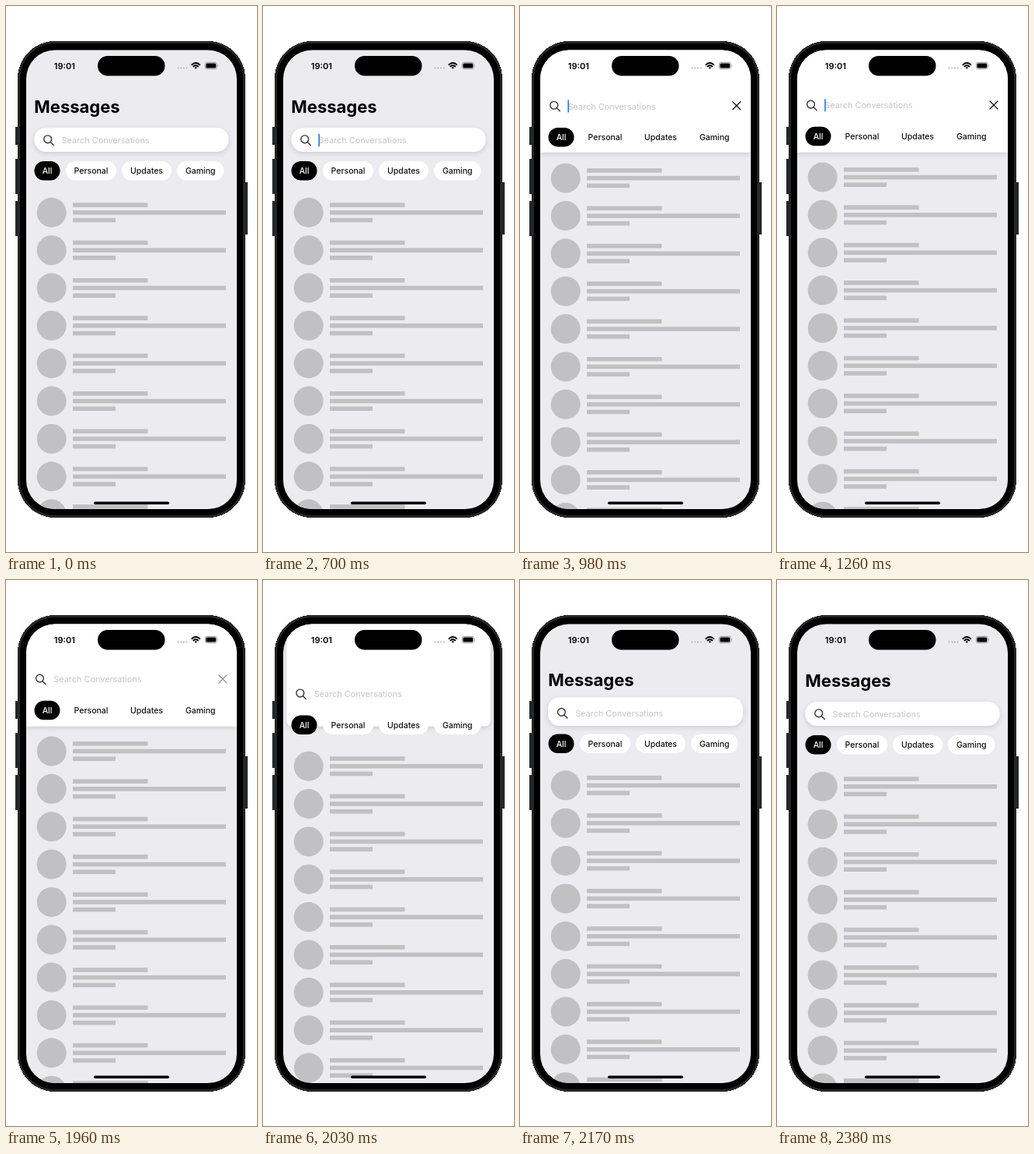
Write an HTML page that moves like this. It is 323 px wide and 700 px high and loops after 3.47 s.

```html
<!DOCTYPE html>
<html lang="en">
<head>
<meta charset="utf-8">
<title>Search field</title>
<style>
html, body { margin: 0; width: 100%; height: 100%; overflow: hidden; background: #fff; }
svg { display: block; width: 323px; height: 700px; font-family: Inter, Roboto, sans-serif; }
#field { filter: drop-shadow(0 2px 3px rgba(0, 0, 0, .13)); fill: #fff; }
.chip { font-size: 10.5px; font-weight: 500; text-anchor: middle; }
.line { fill: none; stroke-linecap: round; }
</style>
</head>
<body>
<svg viewBox="0 0 323 700">
  <defs>
    <clipPath id="screen"><rect x="26" y="56.5" width="271" height="588.5" rx="37"/></clipPath>
  </defs>

  <g shape-rendering="crispEdges">
    <path d="M12 155h4v23h-4zM12 196h4v45h-4zM12 250h4v45h-4zM307 226h4v67h-4z" fill="#242626"/>
    <rect x="15" y="45" width="293" height="611" rx="48" fill="#242828"/>
  </g>
  <rect x="18" y="48" width="287" height="605" rx="45"/>

  <g clip-path="url(#screen)">
    <rect x="26" y="56" width="271" height="590" fill="#ebebf0"/>
    <g id="page">
      <text x="36.3" y="137" font-size="22" font-weight="700">Messages</text>
      <g id="rows" fill="#c1c1c3"></g>
    </g>
    <rect id="field"/>
    <g id="chips"></g>
    <g id="search">
      <g class="line" stroke="#333" stroke-width="1.4">
        <circle cx="53.7" cy="170.8" r="4.9"/><path d="M57.3 174.4l4 4"/>
      </g>
      <text x="71.5" y="176.2" font-size="10.9" fill="#c5c5c8">Search Conversations</text>
      <rect id="caret" x="71.3" y="164" width="1.7" height="16" fill="#2c83dc"/>
    </g>
    <g id="close" class="line" stroke="#111" stroke-width="1.3">
      <path pathLength="1" d="M5-5L-5 5"/><path pathLength="1" d="M-5-5L5 5"/>
    </g>

    <text x="75.3" y="80.7" font-size="11" font-weight="600" text-anchor="middle">19:01</text>
    <rect x="118" y="64" width="86.5" height="25.5" rx="12.75"/>
    <path class="line" d="M221.5 79.5h12" stroke="#b4b4b8" stroke-width="2" stroke-dasharray="0 3.7"/>
    <g class="line" stroke="#000" stroke-width="1.8" stroke-linecap="butt">
      <path d="M239.3 75.2q5-4.4 10 0M241.3 77.5q3-2.5 6 0"/>
    </g>
    <path d="M242.6 78.9q1.7-1.3 3.4 0l-1.7 1.9z"/>
    <rect x="256.3" y="72.3" width="15" height="8.4" rx="2.5" fill="none" stroke="#999"/>
    <rect x="257.4" y="73.4" width="12.8" height="6.2" rx="1.5"/>
    <path d="M272.6 75v3q1.2-1.5 0-3" fill="#888"/>
    <rect x="113" y="635.5" width="97" height="3.6" rx="1.8"/>
  </g>
</svg>
<script>
const LOOP = 3470, STEP = 70;
const $ = id => document.getElementById(id);
const set = (el, attrs) => { for (const k in attrs) el.setAttribute(k, attrs[k]); };
const mix = (a, b, p) => a + (b - a) * p;
const move = (id, x, y) => $(id).setAttribute('transform', `translate(${x} ${y})`);

const bar = (y, w) => `<rect x="86" y="${y - 2.8}" width="${w}" height="5.6"/>`;
$('rows').innerHTML = Array.from({ length: 10 }, (_, i) => {
  const y = 264.8 + 48.35 * i;
  return `<circle cx="58.7" cy="${y}" r="19"/>` + bar(y - 9.7, 96.5) + bar(y, 197) + bar(y + 9.7, 55);
}).join('');

$('chips').innerHTML = [['All', 36.5, 33], ['Personal', 77, 65], ['Updates', 149, 64], ['Gaming', 220, 60.5]]
  .map(([name, x, w], i) =>
    `<rect x="${x}" y="199" width="${w}" height="24.5" rx="12.25" fill="${i ? '#fff' : '#000'}"/>` +
    `<text class="chip" x="${x + w / 2}" y="215" fill="${i ? '#111' : '#fff'}">${name}</text>`).join('');

// Critically damped spring from 0 to 1
const spring = ms => {
  const x = Math.max(0, ms) * .0273;
  return 1 - (1 + x) * Math.exp(-x);
};

function openness(t) {
  if (t < 1050) return spring(t - 777);
  if (t < 2380) return 1 - spring(t - 1977);
  return 0;
}

function draw(now) {
  const t = Math.floor(now % LOOP / STEP) * STEP;
  const p = openness(t);

  move('page', 0, -45.3 * p);
  move('chips', 0, -44.2 * p);
  move('search', -10.2 * p, -44.7 * p);

  const x = mix(36.3, 26, p), y = mix(156, -24, p);
  set($('field'), { x, y, width: 323 - 2 * x, height: mix(187, 187.7, p) - y, rx: 15.5 * (1 - p) });
  $('caret').style.opacity = t >= 700 && t < 1960 ? 1 : 0;

  const drawn = Math.max(0, Math.min(1, (p - .3) * 1.9));
  move('close', mix(266.5, 279, p), mix(153, 127, p));
  $('close').style.opacity = t < 1960 ? +(drawn > 0) : t < 2030 ? .45 : 0;
  [...$('close').children].forEach((line, i) => {
    const part = Math.max(0, i ? drawn * 2 - 1 : drawn);
    set(line, { 'stroke-dasharray': `${part} 2`, opacity: +(part > 0) });
  });
}

const start = performance.now();
function tick() {
  draw(performance.now() - start);
  requestAnimationFrame(tick);
}
tick();
</script>
</body>
</html>
```
